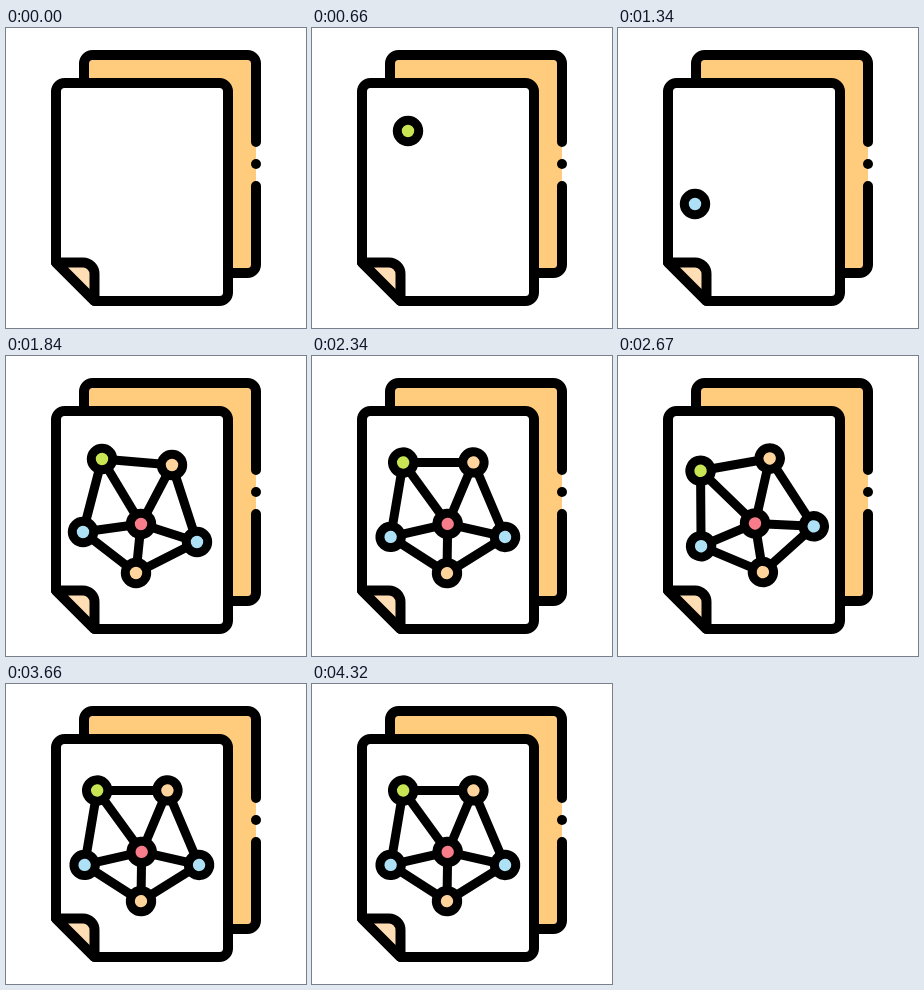
Recreate the animation shown at these times as an HTML page. Size 300x300 px, loop 4.65 s.

```html
<!DOCTYPE html>
<html lang="en">
<head>
<meta charset="utf-8">
<title>Network on paper</title>
<style>
  html, body { margin: 0; height: 100%; overflow: hidden; background: #fff; }
  svg { display: block; width: 100%; height: 100%; }
</style>
</head>
<body>
<svg viewBox="0 0 300 300" fill="none" stroke="#000" stroke-width="10" stroke-linecap="round" stroke-linejoin="round">
  <!-- back sheet -->
  <rect x="78" y="27" width="172" height="218" rx="8.5" fill="#ffcb7c" stroke="none"/>
  <path d="M78 55V35.500a8.500 8.500 0 0 1 8.500-8.500H241.500a8.500 8.500 0 0 1 8.500 8.500V114M250 158V236.500a8.500 8.500 0 0 1-8.500 8.500H222"/>
  <circle cx="250" cy="136" r="5" fill="#000" stroke="none"/>
  <!-- front sheet with folded corner -->
  <path fill="#fff" d="M50 234.500V63.500a8.500 8.500 0 0 1 8.500-8.500H213.500a8.500 8.500 0 0 1 8.500 8.500V264.500a8.500 8.500 0 0 1-8.500 8.500H88.500Z"/>
  <path fill="#ffddb5" d="M50 234.500H77a11.500 11.500 0 0 1 11.500 11.500V273Z"/>
  <g id="graph" stroke-width="9"></g>
</svg>
<script>
const LOOP = 4650;
const PIVOT = "134 160";

const nodes = {
  center: [135, 168, "#f87c89"],
  green: [96, 103, "#c8e553"],
  peach: [166, 109, "#ffd39c"],
  right: [191, 186, "#aee1f5"],
  bottom: [130, 217, "#ffd39c"],
  left: [77, 176, "#aee1f5"]
};
const links = [
  "green peach", "green left", "green center", "peach center", "peach right",
  "center left", "center right", "center bottom", "left bottom", "right bottom"
];

// Each step: start time, visible node ("" none, "all" every one), tilt of the linked graph.
const steps = [
  [0, ""], [330, "center"], [660, "green"], [830, "peach"],
  [1000, "right"], [1170, "bottom"], [1340, "left"], [1510, "all"],
  [1840, "all", 0], [2340, "all", -5], [2670, "all", -15], [3000, "all", -5],
  [3330, "all", 0], [3660, "all", -5], [3990, "all", -10], [4320, "all", -5]
];

const graph = document.getElementById("graph");

function add(parent, tag, attributes) {
  const element = document.createElementNS("http://www.w3.org/2000/svg", tag);
  for (const name in attributes) element.setAttribute(name, attributes[name]);
  return parent.appendChild(element);
}

const lines = add(graph, "g", {});
for (const link of links) {
  const [[x1, y1], [x2, y2]] = link.split(" ").map(name => nodes[name]);
  add(lines, "line", { x1, y1, x2, y2 });
}

const dots = {};
for (const name in nodes) {
  const [cx, cy, fill] = nodes[name];
  dots[name] = add(graph, "circle", { cx, cy, fill, r: 10.7 });
}

function show(element, visible) {
  element.setAttribute("visibility", visible ? "visible" : "hidden");
}

function draw() {
  const time = performance.now() % LOOP;
  const [, shown, tilt] = steps.filter(([start]) => start <= time).pop();
  for (const name in dots) show(dots[name], shown === "all" || shown === name);
  show(lines, tilt !== undefined);
  graph.setAttribute("transform", `rotate(${tilt || 0} ${PIVOT})`);
  requestAnimationFrame(draw);
}
draw();
</script>
</body>
</html>
```
